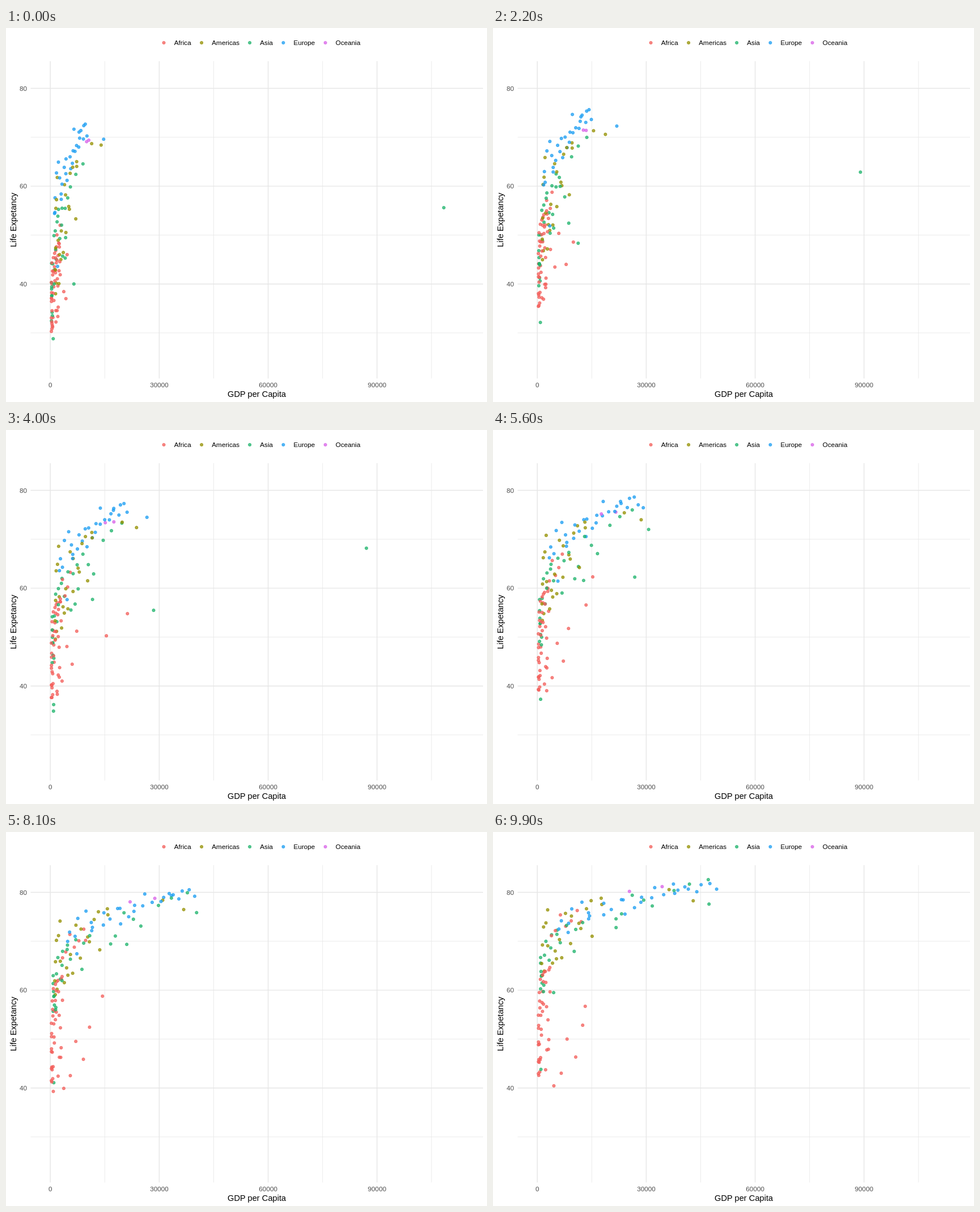
Recreate the animation shown at these times as an HTML page with a canvas. Size 849 by 660 pixels, loop 10 s.

```html
<!DOCTYPE html>
<html lang="en">
<head>
<meta charset="utf-8">
<title>Life expectancy and GDP</title>
<style>
  html, body { margin: 0; width: 100%; height: 100%; overflow: hidden; background: #fff; }
  svg, canvas { position: absolute; left: 0; top: 0; width: 849px; height: 660px; }
  text { font-family: "Liberation Sans", Arial, sans-serif; font-size: 11.73px; }
  .tick { fill: #4d4d4d; }
  .title { font-size: 14.67px; text-anchor: middle; }
</style>
</head>
<body>
<svg id="chart" viewBox="0 0 849 660"></svg>
<canvas id="dots"></canvas>
<script>
const W = 849, H = 660, FRAMES = 100, STEP = 100;
const PANEL = { left: 43.5, right: 842, top: 58.5, bottom: 618.5 };
const COLORS = {
  Africa: '#F35E5A', Americas: '#949000', Asia: '#1DB36B', Europe: '#1B9DF2', Oceania: '#D862E8'
};

// GDP is counted in hundreds
const px = gdp => 78.2 + gdp * 0.64075;
const py = life => 106.5 + (80 - life) * 8.63;

const mix = (a, b, t) => a + (b - a) * t;
const clamp = t => Math.min(1, Math.max(0, t));

// Value at t (0..1) on a line through evenly spaced points
function curve(pts, t) {
  const p = t * (pts.length - 1);
  const i = Math.min(Math.floor(p), pts.length - 2);
  return mix(pts[i], pts[i + 1], p - i);
}

function seeded(seed) {
  return () => {
    seed = (seed + 0x6D2B79F5) | 0;
    let r = Math.imul(seed ^ (seed >>> 15), 1 | seed);
    r = (r + Math.imul(r ^ (r >>> 7), 61 | r)) ^ r;
    return ((r ^ (r >>> 14)) >>> 0) / 4294967296;
  };
}
const random = seeded(1952);
const spread = size => (random() - 0.5) * size;

const dots = [];
const add = (group, gdp, life) => dots.push({ color: COLORS[group], gdp, life, order: random() });

// from, to: [low, high] at both ends of time; skew bends the ranks, pace bends time
function range({ from, to, skew, pace }, rank) {
  const at = limits => mix(limits[0], limits[1], clamp(rank + spread(0.08)) ** skew);
  const a = at(from), b = at(to);
  return t => mix(a, b, t ** pace);
}

// Richer members tend to live longer; mess loosens that link
function crowd(group, n, mess, gdp, life) {
  const members = Array.from({ length: n }, (_, i) => {
    const rank = i / (n - 1);
    return { rank, key: rank + spread(mess) };
  });
  members.sort((a, b) => a.key - b.key);
  members.forEach((m, i) => add(group, range(gdp, m.rank), range(life, i / (n - 1))));
}

crowd('Africa', 38, 1.5,
  { from: [3, 27], to: [3, 36], skew: 2, pace: 1 },
  { from: [30, 48.5], to: [42, 65.5], skew: 1, pace: 0.6 });
crowd('Africa', 6, 0.8,
  { from: [14, 27], to: [38, 110], skew: 1.2, pace: 1.2 },
  { from: [42, 52], to: [71, 76.4], skew: 1, pace: 0.85 });
crowd('Africa', 5, 1,
  { from: [5, 47], to: [45, 125], skew: 1, pace: 1.2 },
  { from: [31, 46], to: [40, 53], skew: 1, pace: 0.3 });
crowd('Americas', 23, 0.9,
  { from: [14, 77], to: [12, 180], skew: 1.8, pace: 1 },
  { from: [38, 66], to: [63, 78.8], skew: 0.9, pace: 0.85 });
crowd('Americas', 2, 0,
  { from: [114, 140], to: [363, 430], skew: 1, pace: 1.2 },
  { from: [68.7, 68.4], to: [80.6, 78.2], skew: 1, pace: 1 });
crowd('Asia', 20, 0.9,
  { from: [3.3, 48], to: [9, 125], skew: 2.7, pace: 1.2 },
  { from: [32, 57.6], to: [60, 74.3], skew: 0.9, pace: 0.9 });
crowd('Asia', 8, 0.7,
  { from: [10, 90], to: [215, 471], skew: 1.5, pace: 1.4 },
  { from: [40, 65], to: [74, 82.6], skew: 0.8, pace: 0.8 });
crowd('Europe', 28, 0.5,
  { from: [10, 101], to: [59, 494], skew: 1.1, pace: 1.4 },
  { from: [54, 72.7], to: [72.5, 81.8], skew: 0.7, pace: 0.75 });
crowd('Oceania', 2, 0,
  { from: [100, 106], to: [344, 252], skew: 1, pace: 1.3 },
  { from: [69.1, 69.4], to: [81.2, 80.2], skew: 1, pace: 1.1 });

// Dots that stand apart
const path = (...pts) => t => curve(pts, t);
const dip = (a, b, depth, when) => t =>
  mix(a, b, t) - depth * Math.exp(-(((t - when) / 0.08) ** 2));

add('Asia', path(1084, 1135, 955, 809, 1093, 593, 314, 281, 349, 403, 351, 473), path(55.6, 66.5, 74.4, 77.6));
add('Asia', path(65, 91, 285, 265, 210, 217), path(40, 52.5, 66.5, 72.8));
add('Asia', path(41, 83, 116, 130, 31, 45), path(45.3, 56, 64, 59.5));
add('Asia', path(4, 17), dip(39.4, 59.7, 17, 5 / 11));
add('Asia', path(8, 10), path(28.8, 43.8));
add('Africa', path(24, 85, 214, 140, 95, 121), path(42.7, 51.5, 67, 74));
add('Africa', path(43, 70, 155, 130, 145, 132), path(37, 47.5, 60.5, 56.7));
add('Africa', path(5, 9), dip(40, 46.2, 21, 8 / 11));
add('Europe', path(147, 255, 308, 375), path(69.6, 81.7));
add('Europe', path(20, 85), path(43.6, 56, 63.8, 71.8));
dots.sort((a, b) => a.order - b.order);

// Static chart
const chart = document.getElementById('chart');
function node(name, attrs, text = '') {
  const el = document.createElementNS('http://www.w3.org/2000/svg', name);
  for (const k in attrs) el.setAttribute(k, attrs[k]);
  el.textContent = text;
  chart.append(el);
}
const rule = (x1, y1, x2, y2, width) =>
  node('line', { x1, y1, x2, y2, stroke: '#E6E6E6', 'stroke-width': width });
const column = (gdp, width) => rule(px(gdp), PANEL.top, px(gdp), PANEL.bottom, width);
const row = (life, width) => rule(PANEL.left, py(life), PANEL.right, py(life), width);

for (let g = 150; g < 1200; g += 300) column(g, 0.8);
for (let l = 30; l < 80; l += 20) row(l, 0.8);
for (let g = 0; g < 1200; g += 300) {
  column(g, 1.42);
  node('text', { x: px(g), y: 633.7, class: 'tick', 'text-anchor': 'middle' }, String(g * 100));
}
for (let l = 40; l <= 80; l += 20) {
  row(l, 1.42);
  node('text', { x: 37, y: py(l) + 4.3, class: 'tick', 'text-anchor': 'end' }, String(l));
}
node('text', { x: 442.6, y: 650.6, class: 'title' }, 'GDP per Capita');
node('text', { transform: 'translate(17.8 338.7) rotate(-90)', class: 'title' }, 'Life Expetancy');

const legend = [
  ['Africa', 278.6], ['Americas', 345.2], ['Asia', 430.2], ['Europe', 489.5], ['Oceania', 563.7]
];
legend.forEach(([name, x]) => node('text', { x: x + 18.1, y: 30.2 }, name));

// Moving dots
const canvas = document.getElementById('dots');
const ctx = canvas.getContext('2d');
const ratio = window.devicePixelRatio || 1;
canvas.width = W * ratio;
canvas.height = H * ratio;
ctx.scale(ratio, ratio);

function dot(x, y, color) {
  ctx.fillStyle = ctx.strokeStyle = color;
  ctx.beginPath();
  ctx.arc(x, y, 2.6, 0, Math.PI * 2);
  ctx.fill();
  ctx.stroke();
}

function draw(ms) {
  const t = Math.floor(ms / STEP) % FRAMES / (FRAMES - 1);
  ctx.clearRect(0, 0, W, H);
  ctx.globalAlpha = 0.75;
  ctx.lineWidth = 0.95;
  legend.forEach(([name, x]) => dot(x, 26, COLORS[name]));
  dots.forEach(d => dot(px(d.gdp(t)), py(d.life(t)), d.color));
}

const start = performance.now();
function loop() {
  draw(performance.now() - start);
  requestAnimationFrame(loop);
}
loop();
</script>
</body>
</html>
```
